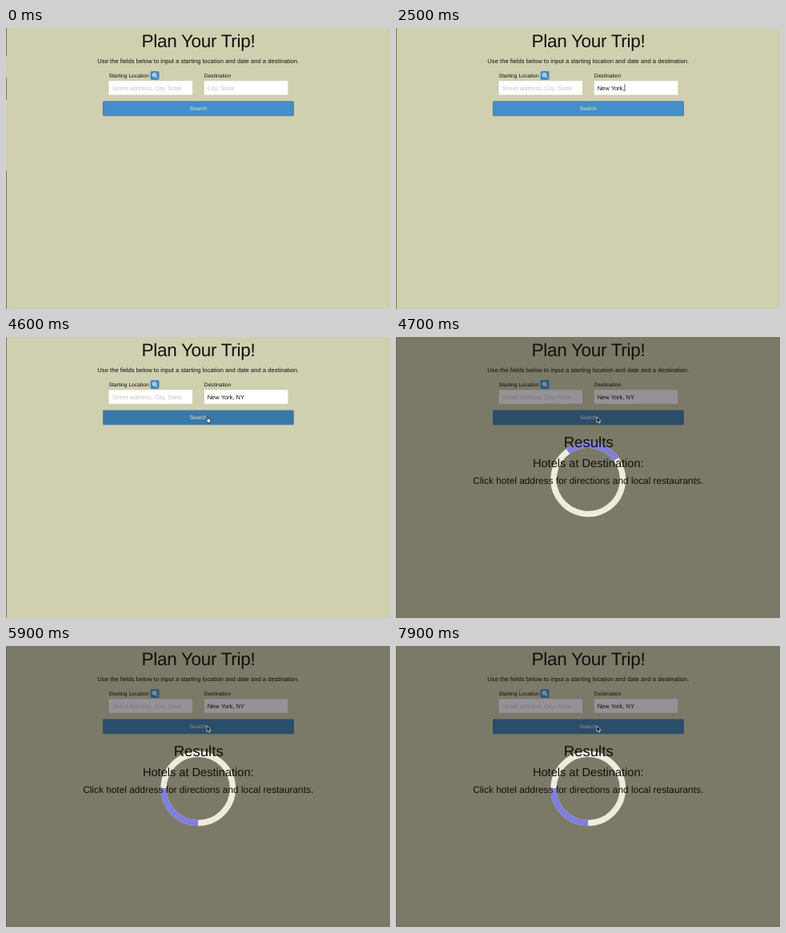
Write an HTML page that moves like this. It is 480 px wide and 352 px high and loops after 8 s.

```html
<!DOCTYPE html>
<html lang="en">
<head>
<meta charset="utf-8">
<title>Plan Your Trip</title>
<style>
  html, body { margin: 0; width: 100%; height: 100%; overflow: hidden; background: #d0d0b1; }
  svg {
    display: block; width: 480px; height: 352px;
    font-family: "Liberation Sans", Arial, sans-serif;
    text-rendering: geometricPrecision;
    --page: #d0d0b1; --edge: #77775f; --box: #fff; --hint: #c6c6c0;
    --btn: #428fca; --rim: #4a7391; --label: #f2e9c4; --icon: #428bbf; --glass: #fff;
  }
  svg.hover { --btn: #3a78a9; --rim: #35607f; }
  svg.pressed { --rim: #4681ab; }
  svg.dim {
    --page: #7b7967; --edge: #66644f; --box: #949296; --hint: #7f7b80;
    --btn: #2a4d69; --rim: #2c4c64; --label: #93958d; --icon: #2b5a7e; --glass: #a9b0b2;
  }
  .mid { text-anchor: middle; }
  .box { fill: var(--box); }
  .hint { fill: var(--hint); }
  .small { font-size: 6.7px; }
  .field { font-size: 7.5px; }
  .loading { visibility: hidden; }
  .dim .loading { visibility: visible; }
</style>
</head>
<body>
<svg id="stage" viewBox="0 0 480 352" fill="#10100c">
  <rect width="480" height="352" fill="var(--page)"/>
  <rect id="edge" width="1" height="352" fill="var(--edge)"/>
  <g id="gaps" fill="var(--page)">
    <rect y="35" width="1" height="27"/>
    <rect y="90" width="1" height="89"/>
  </g>

  <text class="mid" x="240.5" y="23.5" font-size="22.5" letter-spacing="-.3">Plan Your Trip!</text>
  <text class="mid" x="240.3" y="43.6" font-size="7.65">Use the fields below to input a starting location and date and a destination.</text>

  <text class="small" x="128.5" y="62">Starting Location</text>
  <rect x="180.5" y="54" width="11" height="11" rx="1.8" fill="var(--icon)"/>
  <g fill="none" stroke="var(--glass)" stroke-width="1">
    <circle cx="185.5" cy="58.8" r="2.2"/>
    <path d="M187.2 60.6L189.2 62.7"/>
    <path d="M184.3 58.8h2.4M185.5 57.6v2.4" stroke-width=".7"/>
  </g>
  <rect class="box" x="128.5" y="66.3" width="104.5" height="17.4"/>
  <text class="field hint" x="132.7" y="77.8">Street address, City, State</text>

  <text class="small" x="247.8" y="62">Destination</text>
  <rect class="box" x="247.8" y="66.3" width="104.5" height="17.4"/>
  <text id="hint" class="field hint" x="251.7" y="77.8">City, State</text>
  <text id="typed" class="field" x="251.7" y="77.8"></text>
  <rect id="caret" y="70.5" width=".8" height="9" fill="#333"/>

  <rect x="121.4" y="92" width="238" height="17.8" rx=".8" fill="var(--btn)" stroke="var(--rim)" stroke-width=".9"/>
  <text class="small mid" x="240.4" y="103.3" fill="var(--label)">Search</text>

  <g class="loading">
    <g id="ring" fill="none" stroke-width="7.4">
      <circle r="43.2" stroke="#efebdc"/>
      <path d="M-30.55 -30.55A43.2 43.2 0 0 1 30.55 -30.55" stroke="#807fdc"/>
    </g>
    <text class="mid" x="240.7" y="137.5" font-size="18.6">Results</text>
    <text class="mid" x="240.3" y="163.2" font-size="14.6">Hotels at Destination:</text>
    <text class="mid" x="240.2" y="184.2" font-size="11.86">Click hotel address for directions and local restaurants.</text>
  </g>

  <path id="arrow" d="M0 0V7.2L1.7 5.7L2.8 8.2L4 7.7L2.9 5.3H5.1Z" fill="#080808" stroke="#eee" stroke-width=".7"/>
  <path id="hand" d="M1.1 .3Q1.9 -.2 2.3 .7L2.9 2.9L4.6 3.1Q5.8 3.3 5.7 4.6L5.2 7.8H2.2L.1 4.8Q.2 3.9 1.5 4.6Z" fill="#fff" stroke="#111" stroke-width=".8"/>
</svg>
<script>
  const LOOP = 8000, LOAD = 4700, PRESS = 3800;
  const WORD = "New York, NY";
  const $ = id => document.getElementById(id);
  const stage = $("stage"), typed = $("typed"), ring = $("ring");

  // pointer track: time, x, y
  const track = [
    [500, 300, 268], [800, 286, 190], [1000, 274, 133], [1100, 267, 86], [1300, 263.5, 76.8],
    [2700, 268, 86], [2800, 262, 97], [3100, 250, 99.6], [LOAD, 250, 99.6], [LOAD + 1, 251, 100]
  ];

  function pointerAt(t) {
    const i = track.findIndex(k => k[0] > t);
    if (i < 0) return track[track.length - 1].slice(1);
    if (i === 0) return track[0].slice(1);
    const [a, x, y] = track[i - 1], [b, u, v] = track[i];
    const p = (t - a) / (b - a);
    return [x + (u - x) * p, y + (v - y) * p];
  }

  const within = (t, a, b) => t >= a && t < b;
  const show = (el, on) => el.style.visibility = on ? "visible" : "hidden";

  function draw(t) {
    const loading = t >= LOAD;
    const hover = within(t, 2800, LOAD);
    stage.classList.toggle("hover", hover);
    stage.classList.toggle("pressed", within(t, PRESS, LOAD));
    stage.classList.toggle("dim", loading);
    show($("gaps"), t < 100);

    const count = t < 2000 ? 0 : Math.min(WORD.length, 1 + Math.floor((t - 2000) / 60));
    const text = WORD.slice(0, count);
    if (typed.textContent !== text) typed.textContent = text;
    show($("hint"), !count);
    $("caret").setAttribute("x", 251.8 + (count ? typed.getComputedTextLength() : 0));
    show($("caret"), within(t, 1300, 1700) || within(t, 2000, 2900) || within(t, 3200, 3700));

    const [x, y] = pointerAt(t);
    for (const id of ["arrow", "hand"]) $(id).setAttribute("transform", `translate(${x} ${y})`);
    show($("hand"), hover);
    show($("arrow"), within(t, 500, 1800) || within(t, 2700, 2800) || loading);

    // one turn every two seconds
    ring.setAttribute("transform", `translate(240.2 178.4) rotate(${9 + (t - LOAD) * 0.18})`);
  }

  function tick() {
    draw(performance.now() % LOOP);
    requestAnimationFrame(tick);
  }
  tick();
</script>
</body>
</html>
```
